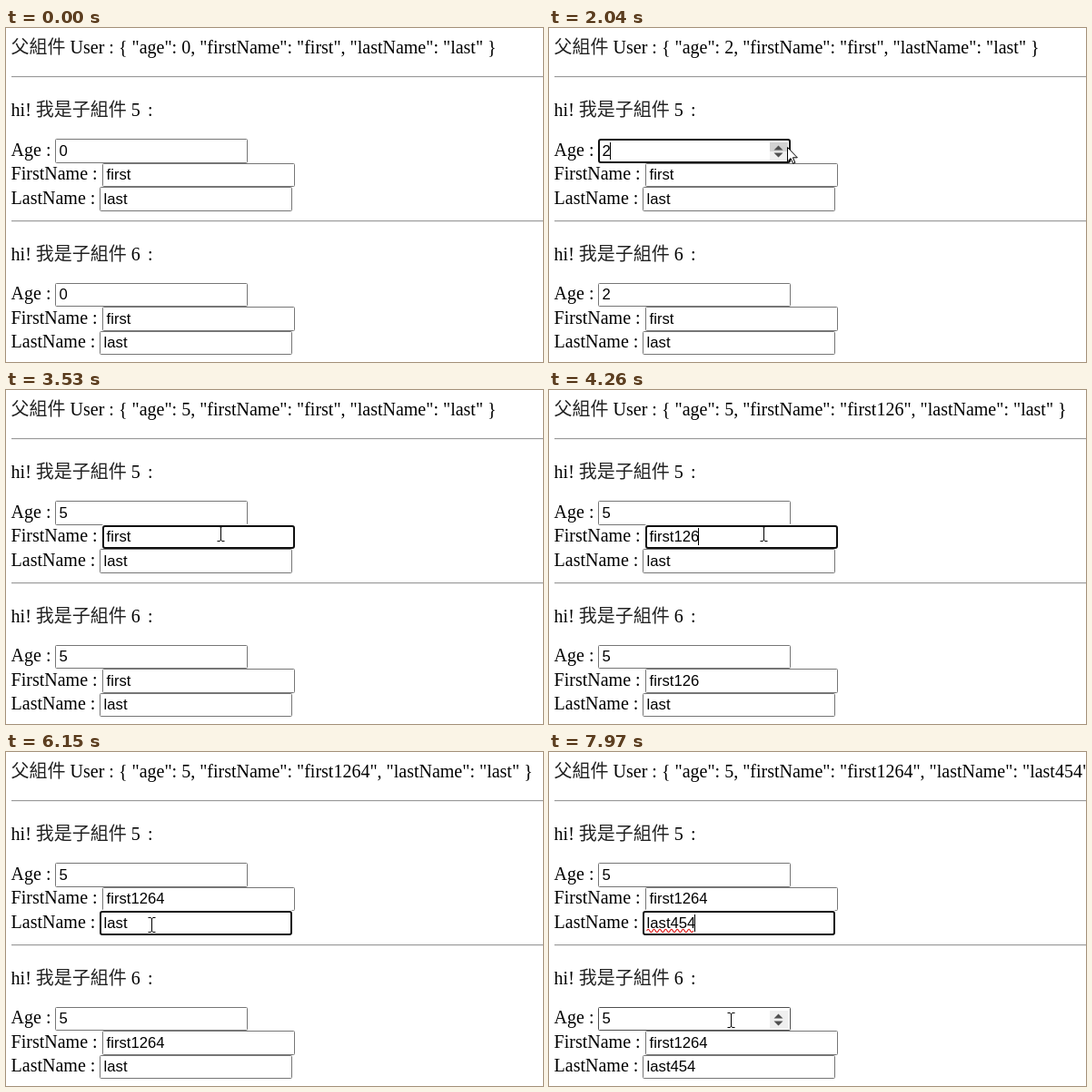
Recreate the animation shown at these times as an HTML page. Size 591x368 px, loop 8000 ms.

```html
<!DOCTYPE html>
<html lang="zh-Hant">
<head>
<meta charset="utf-8">
<style>
html, body { margin: 0; width: 100%; height: 100%; overflow: hidden; background: #fff; }
svg { display: block; }
text { font: 300 20px "Liberation Serif", "Noto Sans CJK TC", serif; white-space: pre; }
tspan { fill: #222; }
.value { font: 16.67px "Liberation Sans", sans-serif; }
</style>
</head>
<body>
<svg id="stage" width="591" height="368" viewBox="0 0 591 368"></svg>
<script>
const LOOP = 8000, BLINK = 530, SPELLCHECK = 1000;
const LEFT = 5.6, BOX_W = 212, VALUE_PAD = 4.6;
const stage = document.getElementById('stage');
const canvas = document.createElement('canvas').getContext('2d');

function textWidth(content, font) {
  canvas.font = font;
  return canvas.measureText(content).width;
}
const valueWidth = content => textWidth(content, '16.67px "Liberation Sans", sans-serif');

// Each field gets focus once, then changes at its key times.
const clicks = Array.from({ length: 5 }, (_, i) => 1640 + 220 * i);
const fields = [
  { name: 'Age', focus: 1640, keys: clicks, value: count => String(count) },
  { name: 'FirstName', focus: 3000, keys: [3790, 3860, 4260, 4400], value: count => 'first' + '1264'.slice(0, count) },
  { name: 'LastName', focus: 5620, keys: [6350, 6610, 6680], value: count => 'last' + '454'.slice(0, count) }
];
for (const field of fields) {
  field.label = field.name + ' : ';
  field.x = Math.round(LEFT + textWidth(field.label, '20px "Liberation Serif", serif'));
}

const rowY = (child, row) => Math.round(122 + 158.6 * child + 26.5 * row);
const boxes = [0, 1].flatMap(child => fields.map((field, row) =>
  ({ field, child, top: rowY(child, row), bottom: rowY(child, row + 1) })));

// start, end, x, y, sideways bow of the path
const moves = [
  [0, 130, 481, 308], [130, 690, 193, 134], [830, 1300, 254, 137], [1300, 1570, 262, 131],
  [2520, 2660, 241, 149], [2660, 2800, 236, 158], [4900, 5490, 159, 193, -10, 35],
  [5630, 5820, 160, 190], [7210, 7970, 200, 295, -130, 100]
];

const text = (x, y, content, cls = '') => `<text x="${x}" y="${y}" class="${cls}">${content}</text>`;
const rect = (x, y, w, h, attrs) => `<rect x="${x}" y="${y}" width="${w}" height="${h}" ${attrs}/>`;
const path = (d, attrs) => `<path d="${d}" ${attrs}/>`;
const rule = y => rect(6, y, 585, 1, 'fill="#9a9a9a"') + rect(6, y + 1, 585, 1, 'fill="#eee"');
const heading = (y, number) =>
  text(LEFT, y, `hi! <tspan>我是子組件</tspan> ${number}`) + text(156, y, ':');

function pointerAt(t) {
  let x, y;
  if (t < moves[0][1]) return null;
  for (const [start, end, toX, toY, bowX = 0, bowY = 0] of moves) {
    if (t < start) break;
    const p = Math.min(1, (t - start) / (end - start));
    const k = p * p * (3 - 2 * p), bow = 4 * k * (1 - k);
    x = p < 1 ? x + (toX - x) * k + bowX * bow : toX;
    y = p < 1 ? y + (toY - y) * k + bowY * bow : toY;
  }
  return { x: Math.round(x), y: Math.round(y) };
}

function spinner(y, hoverHalf) {
  const shade = half => `fill="${hoverHalf === half ? '#d2d2d2' : '#efefef'}"`;
  return rect(243, y - 10, 20, 10, shade('up')) + rect(243, y, 20, 10, shade('down')) +
    path(`M247.5 ${y - 1.5}l5-5 5 5zM247.5 ${y + 1.5}l5 5 5-5z`, 'fill="#505050"');
}

// The focus ring has a white halo that covers the neighbouring border.
const focusRing = (x, y, h) =>
  rect(x - 1, y - 1, BOX_W + 2, h + 2, 'rx="3" fill="#fff"') +
  rect(x + 1, y + 1, BOX_W - 2, h - 2, 'rx="2" fill="#fff" stroke="#101010" stroke-width="2"');

const border = (x, y, h, hovered) =>
  rect(x + .5, y + .5, BOX_W - 1, h - 1, `rx="1" fill="#fff" stroke="${hovered ? '#4f4f4f' : '#767676'}"`);

function caretAndSpelling(x, base, value, idle, isWord) {
  const width = valueWidth(value);
  let out = '';
  if (isWord && idle > SPELLCHECK)
    out += path(`M${x} ${base + 3}q1.6 -3.4 3.2 0` + 't3.2 0'.repeat(width / 3.2 - 1),
      'fill="none" stroke="#e02020" stroke-width="1.2"');
  if (idle % (2 * BLINK) < BLINK)
    out += rect(Math.round(x + width - 1), base - 15, 1, 19, '');
  return out;
}

function drawBox({ field, child, top, bottom }, t, active, pointer, hovered) {
  const base = bottom - 8, height = bottom - top, middle = top + 14;
  const valueX = field.x + VALUE_PAD, isAge = field === fields[0];
  const past = field.keys.filter(key => key <= t);
  const value = field.value(past.length);
  const focused = child === 0 && field === active;
  let out = text(LEFT, base, field.label);
  out += focused ? focusRing(field.x, top, height) : border(field.x, top, height, hovered);
  if (isAge && (focused || hovered))
    out += spinner(middle, hovered && pointer.x > 240 && (pointer.y > middle ? 'down' : 'up'));
  out += text(valueX, base, value, 'value');
  if (focused)
    out += caretAndSpelling(valueX, base, value, t - Math.max(field.focus, ...past), !isAge);
  return out;
}

function drawPointer({ x, y }, isText) {
  const at = `transform="translate(${x} ${y})"`;
  return isText
    ? path('M-3.5 -7.5h2.5l1.5 1 1.5 -1h2.5M.5 -6.5v14M-3.5 8.5h2.5l1.5 -1 1.5 1h2.5', at + ' fill="none" stroke="#000"')
    : path('M.5 .5V16l3.6 -3.4 2.5 5.8 2.3 -1 -2.5 -5.6H11.3z', at + ' fill="#fff" stroke="#000"');
}

function scene(t) {
  const [age, first, last] = fields.map(f => f.value(f.keys.filter(key => key <= t).length));
  const active = fields.findLast(f => f.focus <= t);
  const pointer = pointerAt(t);
  const hovered = pointer && boxes.find(({ field, top, bottom }) =>
    pointer.x >= field.x && pointer.x <= field.x + BOX_W && pointer.y >= top && pointer.y <= bottom);
  let out = text(LEFT, 28, `<tspan>父組件</tspan> User : { "age": ${age}, "firstName": "${first}", "lastName": "${last}" }`);
  out += rule(53) + heading(97, 5) + rule(212) + heading(256, 6);
  for (const box of boxes) out += drawBox(box, t, active, pointer, box === hovered);
  if (pointer) {
    const onSpinner = hovered && hovered.field === fields[0] && pointer.x > 242;
    out += drawPointer(pointer, hovered && !onSpinner);
  }
  return out;
}

const start = performance.now();
function tick() {
  stage.innerHTML = scene((performance.now() - start) % LOOP);
  requestAnimationFrame(tick);
}
tick();
</script>
</body>
</html>
```
